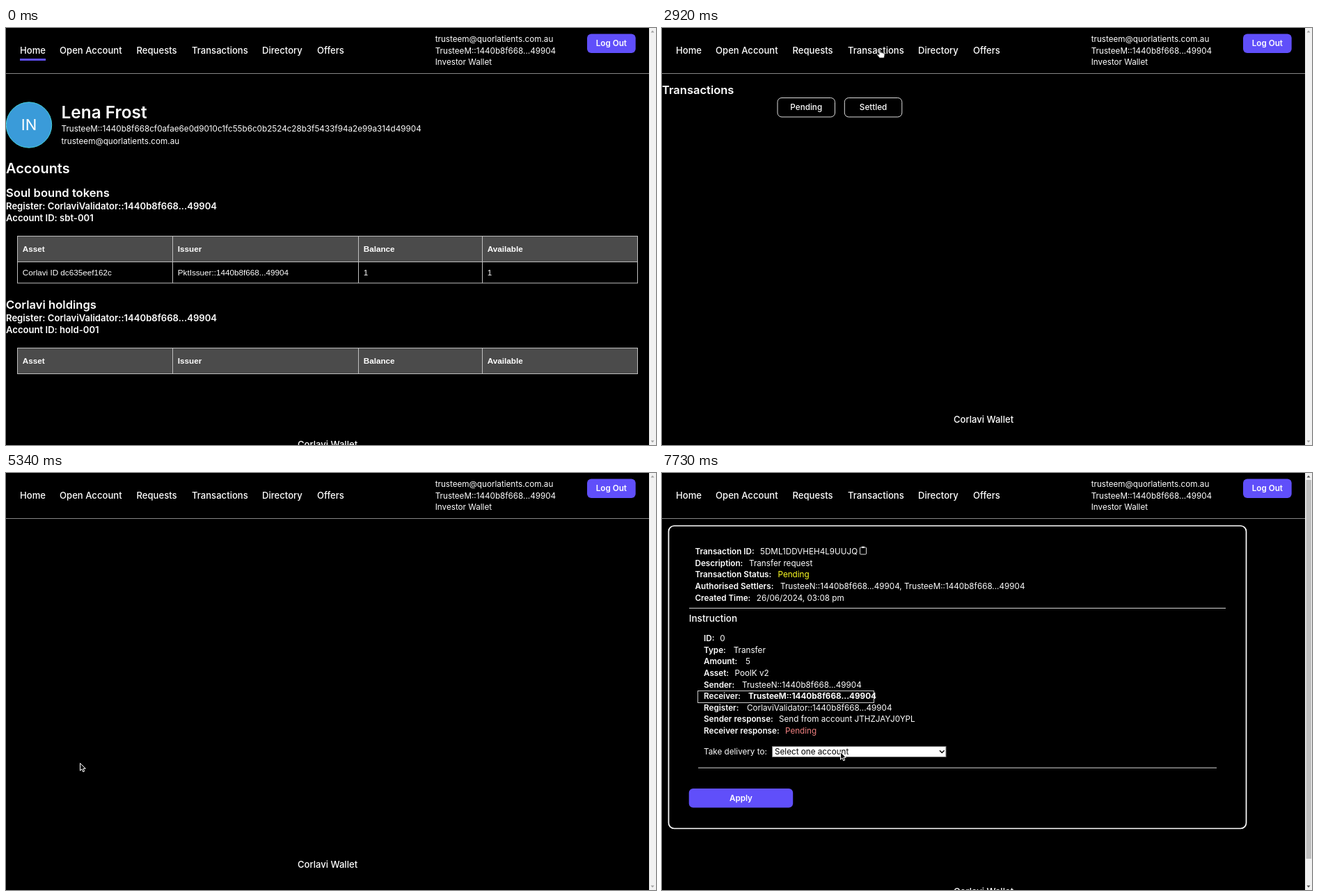
These frames come from a looping animation (934x600 px, 8 s). An HTML page:

```html
<!DOCTYPE html>
<html lang="en">
<head>
<meta charset="utf-8">
<title>Wallet walkthrough</title>
<style>
  html, body { margin: 0; width: 100%; height: 100%; overflow: hidden; background: #000; }
  svg { display: block; width: 934px; height: 600px; font-family: Inter, sans-serif; }
  text { white-space: pre; }
  .table text { font-family: "Liberation Sans", Arial, sans-serif; }
</style>
</head>
<body>
<svg id="stage" viewBox="0 0 934 600"></svg>
<script>
const LOOP = 8000, BODY = 11.7;
const ACCENT = '#604ffa', WHITE = '#fff', RULE = '#d4d4d4', GRID = '#bfbfbf';
const HASH = '1440b8f668...49904';
const HOLDER = 'TrusteeM::' + HASH, SENDER = 'TrusteeN::' + HASH;
const REGISTER = 'CorlaviValidator::' + HASH;
const EMAIL = 'trusteem@quorlatients.com.au';
const stage = document.getElementById('stage');

function add(parent, tag, attrs, content) {
  const node = document.createElementNS('http://www.w3.org/2000/svg', tag);
  for (const key in attrs) node.setAttribute(key, attrs[key]);
  if (content !== undefined) node.textContent = content;
  return parent.appendChild(node);
}
const group = (parent, attrs = {}) => add(parent, 'g', attrs);
const label = (parent, x, y, content, size = BODY, weight = 400, fill = WHITE, anchor = 'start') =>
  add(parent, 'text', { x, y, fill, 'font-size': size, 'font-weight': weight, 'text-anchor': anchor }, content);
const box = (parent, x, y, width, height, fill, extra = {}) =>
  add(parent, 'rect', { x, y, width, height, fill, ...extra });
const rule = (parent, x1, x2, y, fill = RULE) => box(parent, x1, y, x2 - x1, 1, fill);
const show = (node, visible) => node.setAttribute('visibility', visible ? 'visible' : 'hidden');

// Distance from each field's label to its value.
const GAP = {
  'Transaction ID': 93.5, 'Description': 77.5, 'Transaction Status': 119, 'Created Time': 88.3,
  'Authorised Settlers': 122.5, 'ID': 23.3, 'Type': 42.7, 'Amount': 60, 'Asset': 44.6, 'Sender': 55,
  'Receiver': 64, 'Register': 62, 'Sender response': 108, 'Receiver response': 117
};
function fields(parent, x, y, rows) {
  rows.forEach(([name, value, fill = WHITE, weight = 400], i) => {
    const base = y + i * 16.6;
    label(parent, x, base, name + ':', BODY, 600);
    label(parent, x + GAP[name], base, value, BODY, weight, fill);
  });
}
function clipboard(parent, x, y) {
  const icon = group(parent, { transform: `translate(${x} ${y})`, fill: 'none', stroke: '#ddd' });
  box(icon, .5, 1.5, 9, 10, 'none', { rx: 1 });
  box(icon, 3, .2, 4, 2.3, '#ddd', { stroke: 'none' });
}
function button(parent, x, y, width, content, attrs, weight) {
  box(parent, x, y, width, 27.5, ACCENT, { rx: 6, ...attrs });
  label(parent, x + width / 2, y + 17.7, content, BODY, weight, WHITE, 'middle');
}

function drawHeader() {
  const header = group(stage);
  [[20, 'Home'], [77, 'Open Account'], [187.5, 'Requests'], [267, 'Transactions'], [368, 'Directory'], [447, 'Offers']]
    .forEach(([x, name]) => label(header, x, 37.4, name, 13.1, 500));
  [EMAIL, HOLDER, 'Investor Wallet'].forEach((line, i) => label(header, 616.7, 20.3 + i * 16.4, line));
  button(header, 835, 8.5, 69.7, 'Log Out', {}, 600);
  rule(header, 0, 924, 65, '#858585');
}

function drawTable(parent, y, rows) {
  const table = group(parent, { class: 'table' });
  const columns = [16.5, 239.5, 506.5, 684.5, 907.5];
  const bottom = y + 37 + rows.length * 30.5;
  box(table, 16.5, y, 891, 37, '#4b4b4b');
  const line = { fill: 'none', stroke: GRID };
  box(table, 16.5, y, 891, bottom - y, 'none', line);
  const inner = columns.slice(1, 4).map(x => `M${x} ${y}V${bottom}`).join('');
  add(table, 'path', { d: inner + `M16.5 ${y + 37}H907.5`, ...line });
  [['Asset', 'Issuer', 'Balance', 'Available'], ...rows].forEach((cells, r) =>
    cells.forEach((cell, c) =>
      label(table, columns[c] + 7.3, y + 22.4 + r * 34, cell, BODY, r ? 400 : 700)));
}

function drawHome() {
  const page = group(stage);
  box(page, 20, 44, 37, 3, ACCENT);
  add(page, 'circle', { cx: 33, cy: 139.5, r: 32.7, fill: '#3a9bd9', stroke: '#46d3de' });
  label(page, 33, 147.3, 'IN', 22, 400, WHITE, 'middle');
  label(page, 79.5, 129.5, 'Lena Frost', 24.4, 600);
  label(page, 79.5, 149.3, 'TrusteeM::1440b8f668cf0afae6e0d9010c1fc55b6c0b2524c28b3f5433f94a2e99a314d49904');
  label(page, 79.5, 167, EMAIL);
  label(page, 0, 209, 'Accounts', 19.9, 600);
  [[243, 'Soul bound tokens', 'sbt-001'], [404, 'Corlavi holdings', 'hold-001']].forEach(([y, title, id]) => {
    label(page, 0, y, title, 16.6, 600);
    label(page, 0, y + 18, 'Register: ' + REGISTER, 13.1, 600);
    label(page, 0, y + 35, 'Account ID: ' + id, 13.1, 600);
  });
  drawTable(page, 299.5, [['Corlavi ID dc635eef162c', 'PktIssuer::' + HASH, '1', '1']]);
  drawTable(page, 460.5, []);
  return page;
}

const transfer = [['ID', '0'], ['Type', 'Transfer'], ['Amount', '5'], ['Asset', 'PoolK v2'], ['Sender', SENDER]];

function drawCard(parent, top, id, time, iconX) {
  const card = group(parent, { transform: `translate(0 ${top})` });
  box(card, 29.5, 0, 865.5, 281.5, '#26282a', { rx: 10 });
  fields(card, 46, 20, [['Transaction ID', id], ['Description', 'Transfer request'],
    ['Transaction Status', 'Pending', '#ffff22'], ['Created Time', time]]);
  clipboard(card, iconX, 8.5);
  rule(card, 37, 887.5, 80.5);
  label(card, 37, 100.5, 'Instruction', 13.6, 500);
  fields(card, 58, 128.7, [...transfer, ['Receiver', HOLDER], ['Register', REGISTER]]);
  rule(card, 50, 874.5, 239);
  box(card, 37.5, 252.5, 99.5, 21, '#efefef');
  label(card, 87.2, 267, 'Action Required', BODY, 400, '#000', 'middle');
}

function drawTransactions() {
  const page = group(stage);
  label(page, 0, 94.7, 'Transactions', 16.5, 600);
  const outline = { fill: 'none', stroke: '#ddd' };
  button(page, 166, 100.5, 82.5, 'Pending', outline, 500);
  button(page, 262.3, 100.5, 82.5, 'Settled', outline, 500);
  return page;
}
function drawCards() {
  const page = group(stage);
  box(page, 267, 44, 81.5, 3, ACCENT);
  drawCard(page, 157, '5DML1DDVHEH4L9UUJQ', '26/06/2024, 03:08 pm', 282.5);
  drawCard(page, 451.5, 'IEZGFOR971ZTNIW6AX', '26/06/2024, 01:25 pm', 271);
  return page;
}

function drawDetail() {
  const page = group(stage);
  box(page, 9.5, 76, 830, 435.5, 'none', { rx: 8, stroke: WHITE, 'stroke-width': 1.7 });
  fields(page, 47.5, 117.2, [['Transaction ID', '5DML1DDVHEH4L9UUJQ'], ['Description', 'Transfer request'],
    ['Transaction Status', 'Pending', '#ffff22'], ['Authorised Settlers', SENDER + ', ' + HOLDER],
    ['Created Time', '26/06/2024, 03:08 pm']]);
  clipboard(page, 284, 105.5);
  rule(page, 39, 810, 194);
  label(page, 38.7, 213.7, 'Instruction', 13.6, 500);
  fields(page, 60, 242.2, [...transfer, ['Receiver', HOLDER, WHITE, 700], ['Register', REGISTER],
    ['Sender response', 'Send from account JTHZJAYJ0YPL'], ['Receiver response', 'Pending', '#f08080']]);
  box(page, 51.5, 313.5, 253, 17, 'none', { stroke: '#ccc' });
  label(page, 60, 405, 'Take delivery to:');
  box(page, 158.5, 393.5, 249.5, 15, WHITE, { stroke: '#777' });
  label(page, 162, 405.2, 'Select one account', BODY, 400, '#000');
  add(page, 'path', { d: 'M399 399.3l3.3 3.3 3.3-3.3', fill: 'none', stroke: '#000', 'stroke-width': 1.4 });
  rule(page, 52, 797, 423.7);
  button(page, 38.7, 454, 149.5, 'Apply', {}, 600);
  return page;
}

drawHeader();
const home = drawHome(), transactions = drawTransactions(), cards = drawCards(), detail = drawDetail();
const footer = label(stage, 462, 600, 'Corlavi Wallet', 13.1, 500, WHITE, 'middle');

box(stage, 924, 0, 10, 600, '#f1f1f1');
const thumb = box(stage, 925.5, 10, 7.5, 550, '#bfbfbf');
const arrows = add(stage, 'path', { d: 'M926.5 6.5h5l-2.5-3zM926.5 593.5h5l-2.5 3z' });

const cursor = group(stage);
const arrow = add(cursor, 'path', {
  d: 'M.5 .5V11.3L3 9 4.8 13 6.7 12.1 5 8.3H8.3Z', fill: '#111', stroke: WHITE, 'stroke-width': 1
});
const hand = add(cursor, 'path', {
  d: 'M-1 1.2Q0-.6 1 1.2V4.6L6 5.8Q7.2 6.3 7 8L6 12.5H-.5L-4 7.8Q-3.6 6.2-1 8Z',
  fill: WHITE, stroke: '#222', 'stroke-width': .7
});

// Each row: start time, visible layers, footer baseline, thumb length (0 = none).
const scenes = [
  [0, [home], 603.5, 0],
  [100, [home], 600.5, 550],
  [2920, [transactions], 567.5, 0],
  [3040, [transactions, cards], 700, 235],
  [5340, [], 567.5, 0],
  [5440, [detail], 606.5, 545]
];
// Pointer path: time, x, y.
const path = [
  [580, 575, 380], [760, 497, 271], [1080, 425, 184], [1380, 370, 119], [1540, 361, 107],
  [1850, 335, 68], [2170, 313, 30.5], [3320, 313, 30.5], [3580, 268, 130], [3740, 245, 180],
  [4230, 139, 408], [4390, 131, 417], [4530, 123, 423], [4720, 106, 417], [6050, 106, 417],
  [6540, 170, 411], [6710, 180, 410], [7000, 222, 406], [7190, 228, 405], [7730, 256, 401]
];
function pointerAt(time) {
  const next = path.findIndex(point => point[0] > time);
  if (next < 0) return path[path.length - 1].slice(1);
  const [t0, x0, y0] = path[next - 1], [t1, x1, y1] = path[next];
  const part = (time - t0) / (t1 - t0);
  return [x0 + (x1 - x0) * part, y0 + (y1 - y0) * part];
}

function render(time) {
  const [, layers, baseline, length] = scenes.filter(scene => scene[0] <= time).pop();
  [home, transactions, cards, detail].forEach(layer => show(layer, layers.includes(layer)));
  footer.setAttribute('y', baseline);
  thumb.setAttribute('height', length);
  arrows.setAttribute('fill', length ? '#555' : '#a3a3a3');

  const visible = time >= path[0][0];
  const [x, y] = visible ? pointerAt(time) : [0, 0];
  const onLink = y < 46;
  cursor.setAttribute('transform', `translate(${x} ${y})`);
  show(arrow, visible && !onLink);
  show(hand, visible && onLink);
}

const start = performance.now();
function tick() {
  render((performance.now() - start) % LOOP);
  requestAnimationFrame(tick);
}
tick();
</script>
</body>
</html>
```
